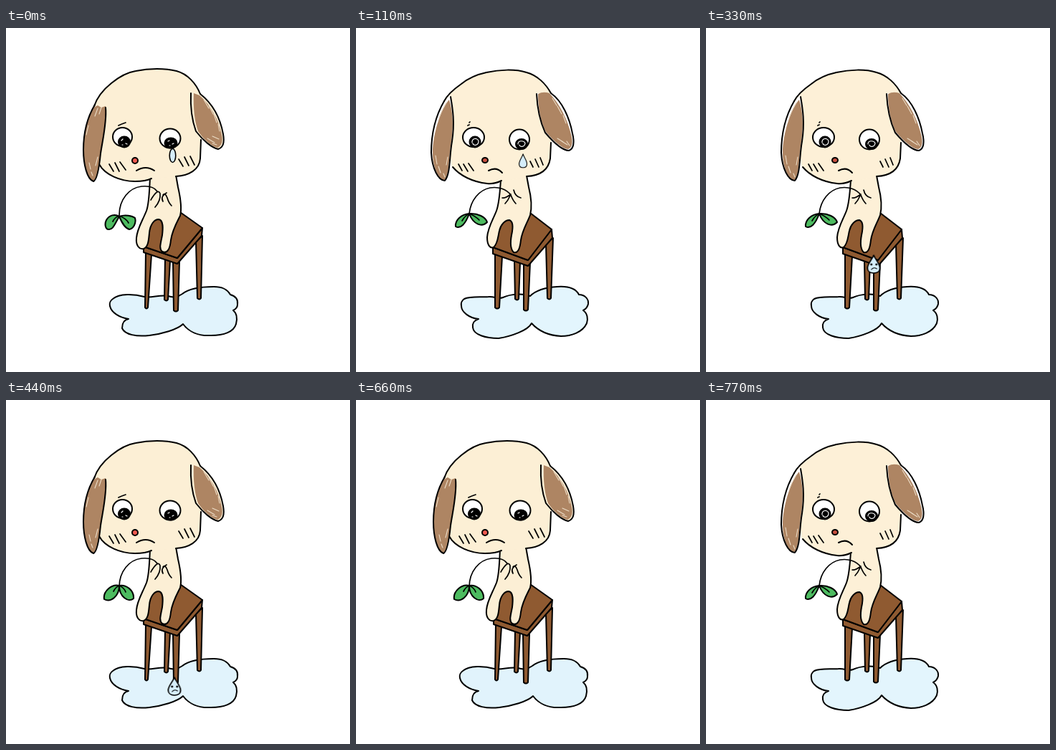
An HTML page without scripts that plays this animation: 480x480 px, repeating every 880 ms.

```html
<!DOCTYPE html>
<html lang="en">
<head>
<meta charset="utf-8">
<title>Sad puppy on a stool</title>
<style>
  html, body { margin: 0; width: 100%; height: 100%; overflow: hidden; background: #fff; }
  svg { display: block; width: 100%; height: 100%; }
  path, ellipse { stroke: #000; stroke-width: 2; stroke-linecap: round; stroke-linejoin: round; fill: none; }

  .cream { fill: #fcefd5; }
  .pose-b .cream { fill: #fdf0d7; }
  .ear { fill: #ae8563; }
  .wood path { fill: #8f5a31; }
  .cloud { fill: #e1f3fc; }
  .pose-b .cloud { fill: #e3f5fd; }
  .leaf { fill: #4dbb60; }
  .nose { fill: #ee5a50; }
  .pose-b .nose { fill: #c9503f; }
  .white { fill: #fff; }
  .ink { fill: #000; }
  .drop { fill: #d5edf9; stroke-width: 1.6; }
  .bare { stroke: none; }
  .thin { stroke-width: 1.7; }
  .fine { stroke-width: 1; }
  .glint { stroke: #fff; stroke-width: 1.2; }
  .chalk { stroke: #ecdcc6; stroke-width: 1.1; }

  /* Two wobbling drawings alternate; .once parts show for one eighth of the loop. */
  .pose { animation: wobble 220ms step-end infinite; }
  .pose-b { animation-delay: -110ms; }
  .once, .rest { animation: once 880ms step-end infinite; animation-delay: calc((var(--i) - 8) * 110ms); }
  .rest { animation-name: rest; }
  @keyframes wobble { 0% { opacity: 1 } 50%, 100% { opacity: 0 } }
  @keyframes once { 0% { opacity: 1 } 12.5%, 100% { opacity: 0 } }
  @keyframes rest { 0% { opacity: 0 } 12.5%, 100% { opacity: 1 } }
</style>
</head>
<body>
<svg viewBox="0 0 480 480">
  <defs>
    <path id="tear" class="drop" d="M0 -12C2 -6 8 0 8 6C8 11 4 13 0 13C-5 13 -8 10 -8 6C-8 0 -2 -6 0 -12Z"/>
    <g id="face">
      <ellipse class="ink bare" cx="-3" cy="1" rx="1.3" ry="1.4"/>
      <ellipse class="ink bare" cx="3.5" cy="1" rx="1.3" ry="1.4"/>
      <path class="fine" d="M-3 8Q0 4 4 7"/>
    </g>
  </defs>

  <g class="pose pose-a">
    <path class="cloud" d="M149 378C158 370 179 371 193 375C203 377 214 372 226 374C235 377 240 375 246 371C256 363 274 361 290 361C303 361 309 365 313 372C320 374 324 379 323 386C323 390 321 392 317 394C322 398 323 405 321 413C318 424 304 429 286 429C269 430 255 424 247 413C239 421 217 427 200 429C182 431 166 428 162 419C162 412 165 407 171 406C158 404 147 397 145 388C144 384 146 380 149 378Z"/>
    <g class="wood">
      <path d="M222 322L229 324L226 379Q224 382 221 379Z"/>
      <path d="M195 312L203 316L198 390Q196 393 194 390Z"/>
      <path d="M265 298L274 290L272 377Q270 380 267 377Z"/>
      <path d="M233 326L242 325L240 394Q237 397 234 394Z"/>
      <path d="M192 305L239 321L274 279L273 290L239 329L192 313Z"/>
      <path d="M203 263L243 257L274 279L239 321L192 305Z"/>
    </g>
    <path class="cream" d="M201 209C200 225 200 244 196 255C190 270 183 280 182 293C181 304 186 309 192 308C199 305 199 295 200 286C201 274 207 267 213 267C220 268 219 280 218 289C216 300 213 308 218 312C226 316 229 306 230 296C232 282 238 272 243 262C246 250 243 235 240 222L237 205"/>
    <path class="cream bare" d="M123 109C128 94 137 85 147 77C158 68 168 62 181 60C200 56 222 56 238 60C253 64 265 77 271 92L272 156V180C270 198 255 206 237 207L203 211C196 214 190 214 180 214C160 214 138 205 128 190Z"/>
    <path d="M123 109C128 94 137 85 147 77C158 68 168 62 181 60C200 56 222 56 238 60C253 64 265 77 271 92M130 190C138 205 160 214 180 214C190 214 197 213 203 210M237 207C255 206 270 198 271 182L272 156"/>
    <path class="ear bare" d="M122 111L128 108L133 111L139 109C141 130 135 155 132 175C130 195 127 212 122 214C113 211 108 190 108 170C108 145 115 122 122 111Z"/>
    <path d="M139 111C141 130 135 155 132 175C130 195 127 212 122 214C113 211 108 190 108 170C108 143 115 122 124 107"/>
    <path class="chalk" d="M128 112l-4 11M133 111l-3 9M115 136l-3 13M128 180l-3 12M116 188l2 9M119 201l2 5"/>
    <path class="cream bare" d="M258 91C258 112 260 130 266 145C275 157 287 167 296 169C303 167 305 159 303 148C299 126 290 107 271 92Z"/>
    <path class="ear bare" d="M262 91C261 112 263 130 268 144C276 156 287 165 295 167C301 165 303 158 301 149C297 128 286 108 270 94Z"/>
    <path d="M258 91C257 112 260 130 265 144C275 157 287 167 296 169C303 167 305 159 303 148C299 126 290 107 271 92"/>
    <path class="chalk" d="M276 100l7 12M283 108l6 12M290 120l4 12M296 134l2 10M288 151l9 4M281 154l10 6M288 161l6 2"/>

    <ellipse class="white" cx="162.500" cy="152" rx="13.500" ry="13"/>
    <ellipse class="ink bare" cx="165" cy="159" rx="9" ry="8.500"/>
    <path class="glint" d="M161 157l2 -2M167 161l2 1M162 163l1 0"/>
    <ellipse class="white" cx="229" cy="154" rx="14.500" ry="13.500"/>
    <ellipse class="ink bare" cx="230" cy="160.500" rx="9.500" ry="8"/>
    <path class="glint" d="M226 158l2 -1M232 162l2 -1M228 164l1 0"/>
    <path class="thin" d="M157 136Q161 134 167 132M144 190l6 10M152 188l6 12M159 187l8 11M241 183l6 10M249 180l6 12M257 179l6 12"/>
    <ellipse class="nose" cx="180" cy="185" rx="4" ry="4"/>
    <path d="M182 199Q195 191 207 199"/>

    <path class="thin" d="M158 261C158 239 172 223 189 221C199 220 207 222 211 228M202 240Q212 223 215 231Q216 241 208 250M224 230Q215 235 219 242M219 233Q222 229 225 237Q227 244 231 248"/>
    <g class="once" style="--i:0">
      <path class="leaf" d="M158 263C152 259 144 261 140 268C137 274 139 281 143 281C149 282 151 275 158 263Z"/>
      <path class="leaf" d="M158 263C166 260 176 262 180 265C182 272 178 280 172 281C165 279 161 270 158 263Z"/>
      <path class="thin" d="M158 262Q152 264 149 270M158 262Q168 266 171 272"/>
    </g>
    <g class="rest" style="--i:0">
      <path class="leaf" d="M158 259C148 256 135 267 137 278C146 283 158 274 158 259Z"/>
      <path class="leaf" d="M158 259C168 257 179 266 178 277C171 283 158 275 158 259Z"/>
      <path class="thin" d="M158 259Q153 261 150 267M158 259Q165 262 167 268"/>
    </g>
  </g>

  <g class="pose pose-b">
    <path class="cloud" d="M151 378C159 374 173 376 185 375C193 374 198 379 205 376C216 371 233 370 243 374C251 366 264 362 281 361C296 360 307 364 311 372C319 372 325 378 324 385C323 390 321 392 317 394C323 398 324 406 322 412C316 425 300 430 286 430C267 429 254 422 245 412C240 422 217 430 199 433C181 433 164 428 163 418C162 411 165 408 171 406C158 405 147 396 147 388C146 383 148 380 151 378Z"/>
    <g class="wood">
      <path d="M221 325L229 327L227 378Q225 381 222 378Z"/>
      <path d="M194 314L204 318L200 390Q197 393 194 390Z"/>
      <path d="M265 301L275 293L272 377Q270 380 267 377Z"/>
      <path d="M234 329L243 327L240 393Q237 396 234 393Z"/>
      <path d="M191 306L240 324L273 281L274 293L240 332L191 315Z"/>
      <path d="M203 264L243 258L273 281L240 324L191 306Z"/>
    </g>
    <path class="cream" d="M202 212C201 227 200 244 196 255C191 268 184 278 183 292C183 303 187 308 192 306C198 301 198 291 200 283C202 274 208 268 214 268C220 270 219 280 217 289C215 300 216 309 220 313C227 315 229 305 230 296C232 282 239 272 243 261C246 249 244 234 241 222L238 206"/>
    <path class="cream bare" d="M123 102C128 92 137 85 147 78C158 69 168 65 182 62C200 58 222 57 238 62C253 66 265 78 272 91L272 160V180C270 196 259 206 238 208L203 214C197 218 191 218 183 217C163 215 143 205 133 192Z"/>
    <path d="M123 102C128 92 137 85 147 78C158 69 168 65 182 62C200 58 222 57 238 62C253 66 265 78 272 91M135 194C145 206 163 215 183 217C191 218 197 216 203 213M238 207C259 206 269 196 271 182L272 160"/>
    <path class="white bare" d="M131 94C117 109 105 145 105 174C106 196 115 213 124 213C132 203 130 180 134 158C138 132 135 113 131 94Z"/>
    <path class="ear bare" d="M130 100C119 112 107 147 107 174C107 195 115 212 124 212C131 203 129 180 133 158C137 132 134 113 130 100Z"/>
    <path d="M123 102C112 121 105 147 105 174C106 196 115 213 124 213C132 203 130 180 134 158C138 132 135 113 132 96"/>
    <path class="chalk" d="M126 104l-5 9M120 114l-4 11M111 178l2 12M115 193l3 9M122 203l2 5M128 180l-2 11"/>
    <path class="white bare" d="M252 91C253 114 257 131 264 146C276 160 289 171 297 171C304 169 305 159 302 147C298 126 288 102 272 91Z"/>
    <path class="ear bare" d="M254 92C254 114 258 131 265 145C277 159 289 169 296 169C302 167 303 159 300 148C295 127 284 106 270 91Q261 88 254 92Z"/>
    <path d="M252 92C253 114 257 131 264 146C276 160 289 171 297 171C304 169 305 159 302 147C298 126 288 102 272 91"/>
    <path class="chalk" d="M274 98l6 10M281 109l6 11M289 122l4 11M281 154l8 5M287 158l8 5M294 158l4 6"/>

    <ellipse class="white" cx="164" cy="152.500" rx="15" ry="13.500"/>
    <ellipse class="ink" cx="166" cy="159" rx="7.500" ry="7.500"/>
    <path class="glint" d="M162 160C161 153 170 153 171 158C171 164 164 165 163 161"/>
    <ellipse class="white" cx="228" cy="155.500" rx="14" ry="14"/>
    <ellipse class="ink" cx="231" cy="162" rx="8" ry="7"/>
    <path class="glint" d="M226 162C226 156 235 157 236 161C235 167 228 166 228 163"/>
    <path class="thin" d="M156 136l2 -1M158 132l1 -1M143 190l5 9M150 190l6 10M157 189l7 10M243 186l4 8M250 183l5 11M257 181l4 10"/>
    <ellipse class="nose" cx="180" cy="184.500" rx="4" ry="3.500"/>
    <path d="M185 199Q196 193 204 202"/>

    <path class="thin" d="M158 259C160 240 172 226 187 223C199 221 210 225 216 233M216 232C212 235 208 238 204 237M215 234Q212 241 208 245M216 233Q219 241 223 245M220 226Q222 235 230 237"/>
    <path class="leaf" d="M158 259C147 260 138 268 139 277C146 281 153 273 158 259Z"/>
    <path class="leaf" d="M158 259C170 258 181 264 183 271C176 278 164 275 158 259Z"/>
    <path class="thin" d="M158 259Q152 262 148 269M158 259Q166 262 172 268"/>
  </g>

  <!-- The tear wells up, falls and ripples the puddle. -->
  <g class="once" style="--i:0"><ellipse class="drop" cx="232.500" cy="178" rx="4.300" ry="9.500"/></g>
  <g class="once" style="--i:1"><use href="#tear" transform="translate(233 185) scale(.68 .76)"/></g>
  <g class="once" style="--i:2">
    <g transform="translate(233.500 255) rotate(-8) scale(.8 .88)"><use href="#tear"/><use href="#face"/></g>
  </g>
  <g class="once" style="--i:3">
    <g transform="translate(234 329) scale(1.080 1)"><use href="#tear"/><use href="#face"/></g>
  </g>
  <g class="once" style="--i:4">
    <g transform="translate(235 399) scale(1.080 1)"><use href="#tear"/><use href="#face"/></g>
  </g>
  <g class="once" style="--i:5">
    <path class="fine" d="M206 385Q201 391 205 398M214 386Q208 392 213 399M264 382Q269 388 265 393M279 380Q288 389 280 400"/>
  </g>
</svg>
</body>
</html>
```
